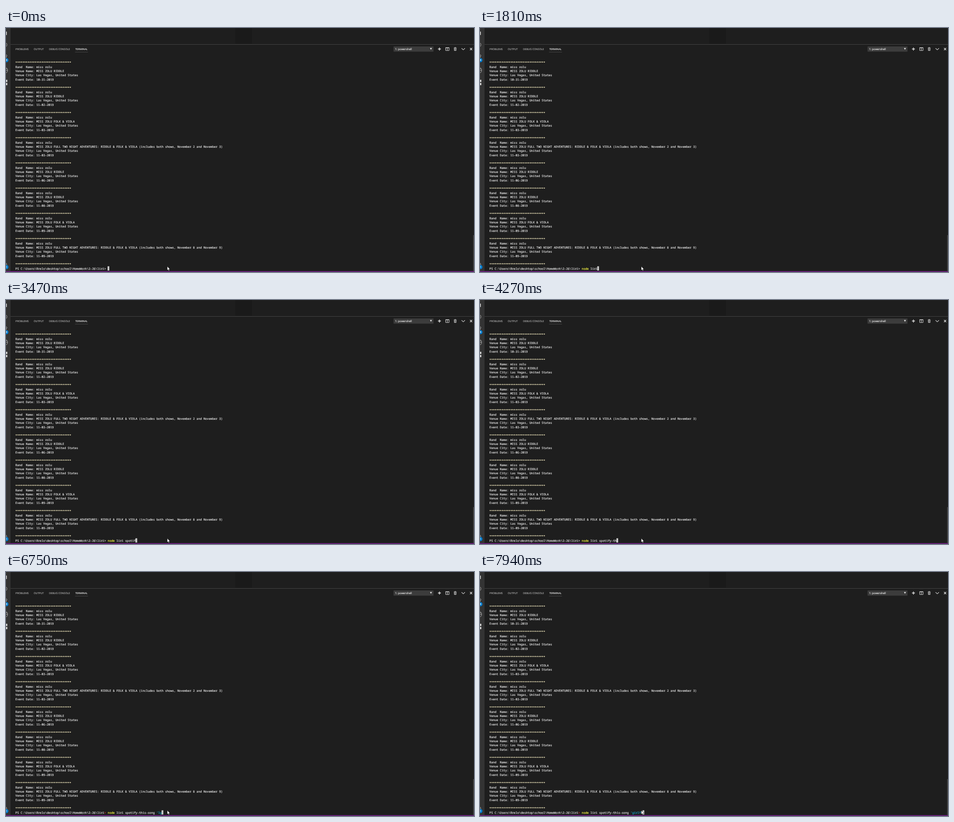
Animation of 1033 by 542 pixels, one loop 8 s. Source, as an HTML page:

```html
<!DOCTYPE html>
<html lang="en">
<head>
<meta charset="utf-8">
<title>Terminal session</title>
<style>
  html, body { margin: 0; width: 100%; height: 100%; overflow: hidden; background: #1e1e1e; }
  svg { display: block; }
  text { text-rendering: geometricPrecision; white-space: pre; fill: currentColor; stroke: currentColor; }
  .term { font: 6.41px "Noto Sans Mono", "DejaVu Sans Mono", monospace; color: #e2e2e2; stroke-width: .22; }
  .ui { font: 5.65px "Open Sans", "Noto Sans", sans-serif; color: #b4b4b4; stroke-width: .12; }
  .ui .bright { color: #f4f4f4; }
  .line { fill: none; stroke: #d8d8d8; }
  .dim { fill: none; stroke: #b0b0b0; }
</style>
</head>
<body>
<svg width="1033" height="542" viewBox="0 0 1033 542" xml:space="preserve">
  <rect width="1033" height="542" fill="#1e1e1e"/>
  <rect x="506" width="37" height="35" fill="#1a1a1a"/>

  <!-- activity bar -->
  <rect width="10" height="542" fill="#333"/>
  <path d="M0 8H1.8V15.5H0M0 115H3V120H0M0 122H3V127H0" fill="#c8c8c8"/>
  <g class="dim">
    <path d="M0 33.5A2.6 3.8 0 0 1 0 41"/>
    <path d="M0 59.5A1.6 1.6 0 0 1 0 63.5M.5 63.5V66"/>
    <path d="M0 88.5A3.6 5.5 0 0 1 0 99.5M0 94H3M0 91L2 90"/>
    <path d="M0 522L1.5 524V527"/>
  </g>
  <g fill="#007acc"><circle cx="1" cy="71.5" r="4.5"/><circle cx="1" cy="531" r="4.5"/></g>
  <g class="ui" font-size="5"><text class="bright" x="-.5" y="73.3">4</text><text class="bright" x="-.5" y="532.8">1</text></g>

  <!-- panel header -->
  <path d="M10 36.5H1033" stroke="#454545"/>
  <g class="ui">
    <text x="21" y="48.7">PROBLEMS</text>
    <text x="61.2" y="48.7">OUTPUT</text>
    <text x="94.9" y="48.7">DEBUG CONSOLE</text>
    <text class="bright" x="152.9" y="48.7">TERMINAL</text>
  </g>
  <path d="M152.5 53.5H181" stroke="#666" stroke-width=".6"/>
  <rect x="855.5" y="41" width="88" height="11.5" fill="#3c3c3c"/>
  <g class="ui" style="font-size:6px"><text class="bright" x="858.7" y="48.9">1: powershell</text></g>
  <path d="M935.8 44.5H940.2L938 48.2Z" fill="#f0f0f0"/>
  <g class="line">
    <path d="M953.5 46.7H960M956.7 43.5V50" stroke-width="1.7"/>
    <path d="M970.5 43.5H978V50H970.5ZM974.2 43.5V50M970.5 44H978"/>
    <path d="M988.5 44.2H994.5M990.3 43.2H992.8M989.5 45V50H993.6V45M991.5 45V50"/>
    <path d="M1005.6 45L1009.3 48.6L1013 45" stroke-width="1.1"/>
    <path d="M1024.2 44.2L1029 49.2M1029 44.2L1024.2 49.2" stroke-width="1.4"/>
  </g>

  <g id="terminal" class="term"></g>
  <rect id="cursor" y="529.3" width="3.845" height="9.4" fill="#ccc"/>

  <rect x="1031" y="460" width="2" height="80" fill="#434343"/>
  <rect y="540" width="1033" height="2" fill="#68217a"/>
  <path d="M356 529.6V538.3L358 536.5L359.3 539.4L360.7 538.8L359.4 536H362Z"
        fill="#fff" stroke="#000" stroke-width=".5"/>
</svg>
<script>
const LOOP = 8000, LEFT = 20.4, CHAR = 3.845, BASE = 79.2, ROW = 56 / 6;
const TEXT_INSET = 0.4;
const PROMPT = "PS C:\\Users\\Brelo\\desktop\\school\\HomeWork\\2-26\\liri> ";
const PROMPT_ROW = 49;
const terminal = document.getElementById("terminal");
const cursor = document.getElementById("cursor");

const columnX = column => LEFT + column * CHAR;

function addText(content, row, column = 0, color = "") {
  const node = document.createElementNS("http://www.w3.org/2000/svg", "text");
  node.setAttribute("x", columnX(column) + TEXT_INSET);
  node.setAttribute("y", BASE + row * ROW);
  node.style.color = color;
  node.textContent = content;
  terminal.append(node);
  return node;
}

const addStars = row => addText("*".repeat(32), row, 0, "#efe6bd");

const riddle = "RIDDLE", folk = "FOLK & VIOLA";
const both = (a, b) =>
  `FULL TWO NIGHT ADVENTURES: ${riddle} & ${folk} (includes both shows, November ${a} and November ${b})`;
const shows = [
  [riddle, "10-31"], [riddle, "11-02"], [folk, "11-03"], [both(2, 3), "11-03"],
  [riddle, "11-06"], [riddle, "11-08"], [folk, "11-09"], [both(8, 9), "11-09"]
];
shows.forEach(([venue, date], i) => {
  addStars(i * 6);
  [
    "Band  Name: miss zolu",
    "Venue Name: MISS ZOLU " + venue,
    "Venue City: Las Vegas, United States",
    `Event Date: ${date}-2019`
  ].forEach((line, j) => addText(line, i * 6 + j + 1));
});
addStars(PROMPT_ROW - 1);

// The ">" is separate because it turns red while a quote is open.
const arrowColumn = PROMPT.length - 2;
addText(PROMPT.slice(0, arrowColumn), PROMPT_ROW);
const arrow = addText(">", PROMPT_ROW, arrowColumn);
const command = addText("", PROMPT_ROW, PROMPT.length, "#f5f543");
const args = addText("", PROMPT_ROW, PROMPT.length + 4);
const quoted = addText("", PROMPT_ROW, 0, "#11a8cd");

// Key presses; "<" is backspace.
const keys = [
  [680, "n"], [870, "o"], [980, "d"], [1090, "e"], [1200, " "], [1310, "l"],
  [1560, "i"], [1690, "r"], [1810, "i"], [1930, " "], [2050, "s"],
  [2240, "p"], [2370, "o"], [2560, "t"], [3230, "i"], [3470, "f"], [3720, "y"],
  [4090, "-"], [4180, "t"], [4270, "h"], [4400, "i"], [4520, "s"], [4720, "-"],
  [4900, "s"], [5020, "o"], [5140, "n"], [5270, "g"], [5450, " "], [5710, "'"],
  [6070, "l"], [6750, "g"], [7060, "<"], [7250, "<"],
  [7350, "g"], [7460, "i"], [7560, "r"], [7750, "l"], [7940, "fr"]
];

function typedAt(time) {
  return keys.filter(([at]) => at <= time)
    .reduce((text, [, key]) => key === "<" ? text.slice(0, -1) : text + key, "");
}

let shown = null;
function draw() {
  const typed = typedAt(performance.now() % LOOP);
  if (typed !== shown) {
    shown = typed;
    const quote = typed.indexOf("'");
    const end = quote < 0 ? typed.length : quote;
    command.textContent = typed.slice(0, 4);
    args.textContent = typed.slice(4, end);
    quoted.textContent = typed.slice(end);
    quoted.setAttribute("x", columnX(PROMPT.length + end) + TEXT_INSET);
    arrow.style.color = quote < 0 ? "" : "#cd3131";
    cursor.setAttribute("x", columnX(PROMPT.length + typed.length));
  }
  requestAnimationFrame(draw);
}
draw();
</script>
</body>
</html>
```
